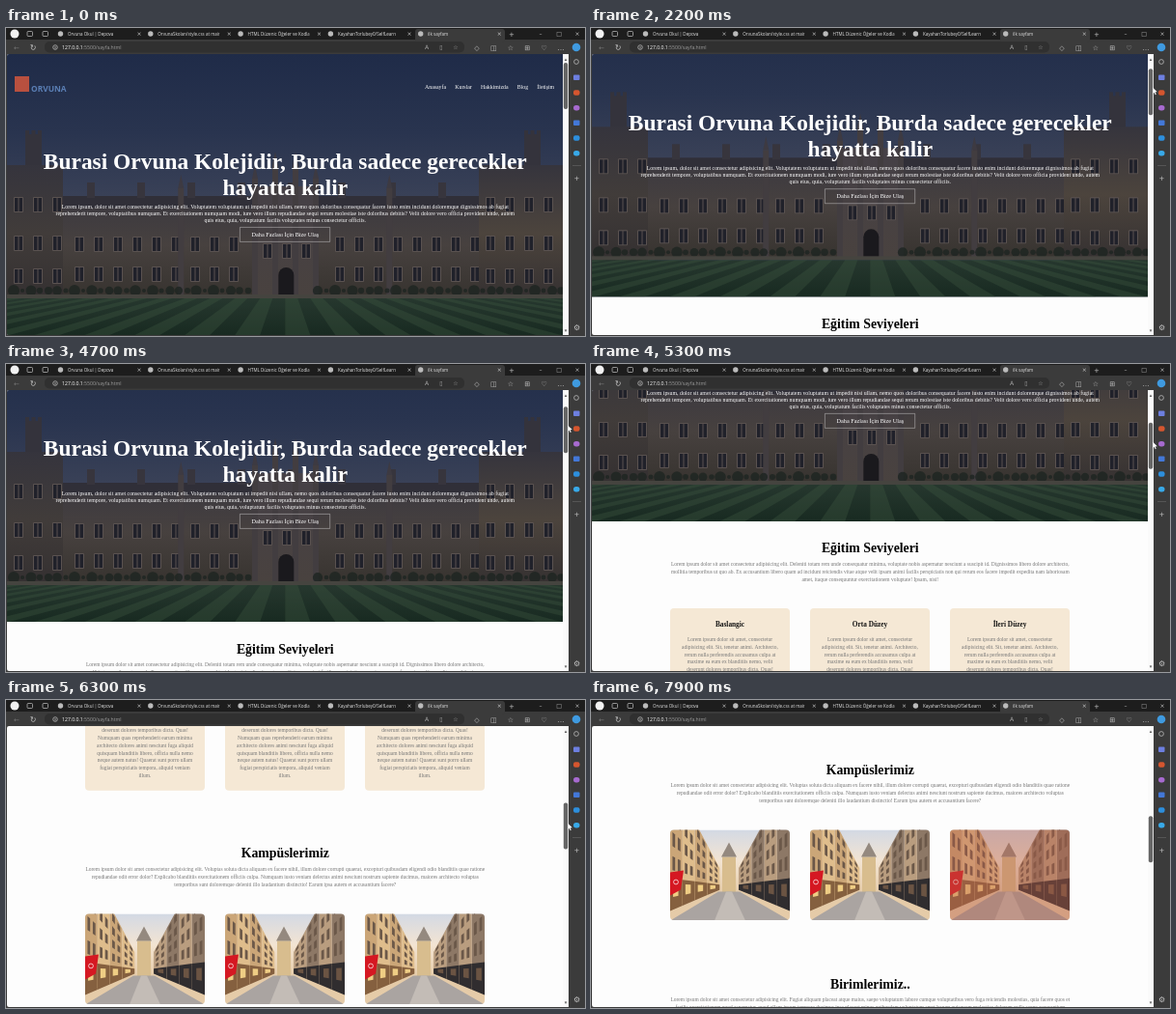
These frames come from a looping animation (600x319 px, 8000 ms). An HTML page with a canvas:

```html
<!DOCTYPE html>
<html lang="tr">
<head>
<meta charset="utf-8">
<title>ilk sayfam</title>
<style>
html, body { margin: 0; width: 100%; height: 100%; overflow: hidden; background: #1d1d1d; }
canvas { display: block; width: 600px; height: 319px; }
</style>
</head>
<body>
<canvas id="stage"></canvas>
<script>
const W = 600, H = 319, LOOP = 8000, STEP = 100;
const canvas = document.getElementById('stage');
const c = canvas.getContext('2d');
const dpr = window.devicePixelRatio || 1;
canvas.width = W * dpr;
canvas.height = H * dpr;

const SERIF = '"Liberation Serif", "Times New Roman", serif';
const SANS = '"Open Sans", "Noto Sans", sans-serif';
const SYMBOL = '"DejaVu Sans", sans-serif';
const ZOOM = 0.3906; // page scale: CSS pixels to stage pixels
const MID = 289.3, TOP = 27, RIGHT = 577, GROUND = 278, BOTTOM = 318;
const INK = '#c4c4c4';

const HERO = [
  'Lorem ipsum, dolor sit amet consectetur adipisicing elit. Voluptatem voluptatum ut impedit nisi ullam, nemo quos doloribus consequatur facere iusto enim incidunt doloremque dignissimos ab fugiat',
  'reprehenderit tempore, voluptatibus numquam. Et exercitationem numquam modi, iure vero illum repudiandae sequi rerum molestiae iste doloribus debitis? Velit dolore vero officia provident unde, autem',
  'quis eius, quia, voluptatum facilis voluptates minus consectetur officiis.'];
const LEVELS = [
  'Lorem ipsum dolor sit amet consectetur adipisicing elit. Deleniti totam rem unde consequatur minima, voluptate nobis aspernatur nesciunt a suscipit id. Dignissimos libero dolore architecto,',
  'mollitia temporibus ut quo ab. Ex accusantium libero quam ad incidunt reiciendis vitae atque velit ipsam animi facilis perspiciatis non qui rerum eos facere impedit expedita nam laboriosam',
  'amet, itaque consequuntur exercitationem voluptate! Ipsam, nisi!'];
const CARD = ['Lorem ipsum dolor sit amet, consectetur', 'adipisicing elit. Sit, tenetur animi. Architecto,',
  'rerum nulla perferendis accusamus culpa at', 'maxime ea eum ex blanditiis nemo, velit',
  'deserunt dolores temporibus dicta. Quas!', 'Numquam quas reprehenderit earum minima',
  'architecto dolores animi nesciunt fuga aliquid', 'quisquam blanditiis libero, officia nulla nemo',
  'neque autem natus! Quaerat sunt porro ullam', 'fugiat perspiciatis tempora, aliquid veniam', 'illum.'];
const CAMPUS = [
  'Lorem ipsum dolor sit amet consectetur adipisicing elit. Voluptas soluta dicta aliquam ex facere nihil, illum dolore corrupti quaerat, excepturi quibusdam eligendi odio blanditiis quae ratione',
  'repudiandae odit error dolor? Explicabo blanditiis exercitationem officiis culpa. Numquam iusto veniam delectus animi nesciunt nostrum sapiente ducimus, maiores architecto voluptas',
  'temporibus sunt doloremque deleniti illo laudantium distinctio! Earum ipsa autem et accusantium facere?'];
const UNITS = [
  'Lorem ipsum dolor sit amet consectetur adipisicing elit. Fugiat aliquam placeat atque maius, saepe voluptatum labore cumque voluptatibus vero fuga reiciendis molestias, quia facere quos et',
  'facilis exercitationem quod aspernatur, quod ullam ipsum tempora ducimus ipsa placeat minus quibusdam voluptatum amet harum quisquam molestiae dolorum nulla saepe accusantium'];

const glide = (t, from, to) => Math.max(0, Math.min(1, (t - from) / (to - from)));
const mix = (a, b, k) => a + (b - a) * k;
const cardX = i => 82 + 145 * i;

function rect(col, x, y, w, h) { c.fillStyle = col; c.fillRect(x, y, w, h); }

function pill(col, x, y, w, h, r) {
  c.fillStyle = col;
  c.beginPath();
  c.roundRect(x, y, w, h, r);
  c.fill();
}

function box(col, x, y, w, h, r = 1) {
  c.strokeStyle = col;
  c.lineWidth = 0.7;
  c.beginPath();
  c.roundRect(x, y, w, h, r);
  c.stroke();
}

function dot(col, x, y, r) { pill(col, x - r, y - r, 2 * r, 2 * r, r); }

function ring(col, x, y, r) { box(col, x - r, y - r, 2 * r, 2 * r, r); }

function poly(col, ...pts) {
  c.fillStyle = col;
  c.beginPath();
  for (let i = 0; i < pts.length; i += 2) c.lineTo(pts[i], pts[i + 1]);
  c.closePath();
  c.fill();
}

function text(s, x, y, size, col, align = 'left', weight = '', face = SERIF) {
  c.font = `${weight} ${size}px ${face}`;
  c.textAlign = align;
  c.fillStyle = col;
  c.fillText(s, x, y);
  return c.measureText(s).width;
}

function symbol(s, x, y, size = 7, col = INK) { text(s, x, y + size * 0.36, size, col, 'center', '', SYMBOL); }

function lines(list, x, y, lead, size, col) {
  list.forEach((s, i) => text(s, x, y + i * lead, size, col, 'center'));
}

function section(title, list, y) {
  text(title, MID, y, 13.8, '#000', 'center', 'bold');
  lines(list, MID, y + 13.5, 20 * ZOOM, 14 * ZOOM, '#777');
}

function fade(y0, y1, ...cols) {
  const g = c.createLinearGradient(0, y0, 0, y1);
  cols.forEach((col, i) => g.addColorStop(i / (cols.length - 1), col));
  return g;
}

function windows(x0, x1, y) {
  for (let x = x0; x < x1; x += 20) {
    pill('#5a5250', x - 1, y - 1, 10, 16, 1);
    rect('#20212a', x, y, 3.5, 14);
    rect('#20212a', x + 4.5, y, 3.5, 14);
  }
}

function pinnacle(x, top, w) {
  rect('#423d40', x - w / 2, top + 14, w, GROUND - top - 14);
  poly('#3d3a42', x - w / 2, top + 14, x, top, x + w / 2, top + 14);
}

function wing(x, w, tower, wall) {
  rect('#34333c', tower, 110, 17, 50);
  for (let i = 0; i < 3; i++) rect('#34333c', tower + i * 6.5, 106, 4, 5);
  rect(fade(140, 285, '#35343d', wall, '#332f30'), x, 142, w, 143);
  for (const y of [176, 216, 250]) windows(x + 8, x + w - 8, y);
}

function college() {
  rect(fade(TOP, 190, '#1f2b48', '#29344f', '#3d4459'), 1, TOP, 576, 291);
  rect(fade(172, GROUND, '#3a3840', '#47413f', '#37332f'), 55, 176, 445, 102);
  rect('#302f38', 55, 174, 445, 12);
  for (let x = 84; x < 500; x += 52) rect('#37353d', x, 160, 8, 16);
  for (const y of [217, 248]) {
    windows(72, 245, y);
    windows(342, 488, y);
  }
  for (const side of [-1, 1]) pinnacle(MID + side * 108, 152, 6);

  rect(fade(160, GROUND, '#454047', '#49423f'), 258, 164, 64, 114);
  for (let i = 0; i < 4; i++) pinnacle(258 + i * 21, i % 3 ? 128 : 142, 6);
  windows(267, 318, 224);
  pill('#1a191d', MID - 7, 248, 16, 30, [8, 8, 0, 0]);

  wing(1, 58, 20, '#413c3a');
  wing(490, 87, 537, '#4c443d');
  for (let x = 8; x < RIGHT; x += 9) {
    if (Math.abs(x - MID) > 30) dot('rgba(29,37,33,.8)', x, 272, 4 + 2 * Math.sin(x));
  }

  rect('#45443f', 1, GROUND - 2, 576, 4);
  rect(fade(GROUND, BOTTOM, '#27382f', '#182a21'), 1, GROUND + 2, 576, 38);
  for (let i = -22; i < 22; i++) {
    const near = MID + i * 52, far = MID + i * 26;
    poly('rgba(62,86,66,.36)', far, GROUND + 2, far + 13, GROUND + 2, near + 26, BOTTOM, near, BOTTOM);
  }
}

// One row of houses running from the picture's edge to the vanishing point.
function houses(edge, vx, vy, cols) {
  const x = k => mix(edge, vx, k), y = (h, k) => vy + h * (1 - k);
  const panel = (col, k0, k1, h0, h1) =>
    poly(col, x(k0), y(h0, k0), x(k1), y(h0, k1), x(k1), y(h1, k1), x(k0), y(h1, k0));
  for (let i = 0; i < 4; i++) {
    const k = i * 0.21;
    panel(cols[i % 2], k, k + 0.21, -115, 24);
    for (const n of [0.04, 0.13]) {
      for (let h = -110; h < -15; h += 26) panel('#6b5849', k + n, k + n + 0.045, h, h + 15);
    }
    panel(cols[2], k, k + 0.21, -8, 26);
    panel(cols[3], k + 0.05, k + 0.14, -2, 12);
  }
}

function street(x, y) {
  c.save();
  c.beginPath();
  c.roundRect(x, y, 124, 93.5, 4);
  c.clip();
  c.translate(x, y);
  rect(fade(0, 65, '#d3d9e4', '#f3e4d2', '#e5cba8'), 0, 0, 124, 94);
  rect('#d8bd8e', 54, 28, 14, 40);
  poly('#94897f', 53, 28, 61, 13, 69, 28);
  poly('#aaa4a1', 50, 64, 72, 64, 124, 94, 0, 94);
  poly('#c3bcb6', 58, 64, 64, 64, 78, 94, 46, 94);
  houses(0, 61, 58, ['#cba678', '#dfbd8c', '#85603f', '#efcd84']);
  houses(124, 61, 58, ['#8d7866', '#b99d7f', '#302d2f', '#6b5443']);
  poly('#d51822', 0, 44, 14, 42, 11, 62, 0, 68);
  ring('#fff', 6, 54, 2.4);
  c.restore();
}

function hero(red) {
  college();
  rect('#b8503f', 9, 50, 15, 16);
  text('ORVUNA', 26, 66, 8.4, '#5b7fb5', 'left', 'bold', SANS);
  let x = 434;
  for (const s of ['Anasayfa', 'Kurslar', 'Hakkimizda', 'Blog', 'İletişim']) {
    x += text(s, x, 63, 15 * ZOOM, '#fff') + 9.2;
  }
  text('Burasi Orvuna Kolejidir, Burda sadece gerecekler', MID, 145.5, 60 * ZOOM, '#fff', 'center', 'bold');
  text('hayatta kalir', MID, 172.5, 60 * ZOOM, '#fff', 'center', 'bold');
  lines(HERO, MID, 187, 6.9, 15 * ZOOM, '#fff');
  c.globalAlpha = red;
  rect('#c41217', 242, 206, 94, 15.5);
  c.globalAlpha = 1;
  box(`rgba(255,255,255,${0.5 * (1 - red)})`, 242.4, 206.4, 93.3, 15, 0);
  text('Daha Fazlası İçin Bize Ulaş', MID, 216, 16 * ZOOM, '#fff', 'center');
}

function page(scroll, red, tint) {
  c.save();
  c.beginPath();
  c.roundRect(1, TOP, 576, 291, [2, 0, 0, 2]);
  c.clip();
  rect('#fdfdfd', 0, TOP, 578, 292);
  c.translate(0, -scroll);

  if (scroll < BOTTOM - TOP) hero(red);
  section('Eğitim Seviyeleri', LEVELS, 350.5);
  ['Baslangic', 'Orta Düzey', 'İleri Düzey'].forEach((s, i) => {
    const mid = cardX(i) + 62;
    pill('#f5e8d5', cardX(i), 408, 124, 125.7, 4);
    text(s, mid, 427, 7.31, '#111', 'center', 'bold');
    lines(CARD, mid, 442, 20 * ZOOM, 14 * ZOOM, '#777');
  });
  section('Kampüslerimiz', CAMPUS, 603.5);
  for (let i = 0; i < 3; i++) street(cardX(i), 661.5);
  pill(`rgba(186,94,70,${0.4 * tint})`, cardX(2), 661.5, 124, 93.5, 4);
  section('Birimlerimiz..', UNITS, 825.5);
  c.restore();

  rect('#fafafa', RIGHT, TOP, 6, 291);
  symbol('▴', 580, 32, 5, '#555');
  symbol('▾', 580, 313, 5, '#555');
  pill('#666', 577.8, 36 + scroll * 0.16, 4.4, 48, 2);
}

function tab(s, x) {
  c.save();
  c.beginPath();
  c.rect(x, 0, 79, 12);
  c.clip();
  dot('#bbb', x + 7.5, 6, 2.7);
  text(s, x + 15, 7.8, 4.5, '#e4e4e4', 'left', '', SANS);
  c.restore();
  symbol('×', x + 89, 6, 6);
}

function browser() {
  rect('#1d1d1d', 0, 0, W, 13);
  rect('#3b3b3b', 0, 12, W, H);
  pill('#3b3b3b', 424, 1, 93, 14, 3);

  dot('#f2f2f2', 9, 6, 4.5);
  for (const x of [22, 38]) box(INK, x, 3.5, 5.5, 5);
  ['Orvuna Okul | Depova', 'OrvunaSkolan/style.css at main', 'HTML Düzenic Öğeler ve Kodlamaları',
    'KayahanTorlubey0/SelfLearn', 'ilk sayfam'].forEach((s, i) => tab(s, 49 + 93.3 * i));
  symbol('+', 524, 6);
  ['–', '□', '×'].forEach((s, i) => symbol(s, 554 + 19 * i, 6, 6));

  symbol('←', 11, 20, 7, '#777');
  symbol('↻', 28, 20, 8);
  pill('#303030', 40, 14, 435, 11.5, 5);
  ring(INK, 51, 20, 2.3);
  rect(INK, 50.7, 19, 0.7, 2.5);
  const w = text('127.0.0.1', 58, 21.8, 5.15, '#fff', 'left', '', SANS);
  text(':5500/sayfa.html', 58 + w, 21.8, 5.15, '#9c9c9c', 'left', '', SANS);
  ['A', '▯', '☆'].forEach((s, i) => symbol(s, 436 + 15 * i, 20, 6, '#aaa'));
  ['◇', '◫', '☆', '⊞', '♡', '…'].forEach((s, i) => symbol(s, 488 + 17.4 * i, 20));
  dot('#3f9ae0', 591, 20, 4.3);

  ring('#c8c8c8', 591, 35, 2.4);
  ['#6d7fe0', '#d5562f', '#a76ad0', '#4378d8', '#2d8fdd', '#38a9e8'].forEach((col, i) => {
    pill(col, 588, 48.5 + 15.7 * i, 6.5, 5.5, 1 + i % 3);
  });
  rect('#666', 587, 142, 9, 0.6);
  symbol('+', 591.5, 155);
  symbol('⚙', 591.5, 310, 8);
}

function pointer(x, y, hand) {
  c.save();
  c.translate(x, y);
  if (hand) {
    pill('#fff', -0.8, 0, 1.6, 5, 0.8);
    pill('#fff', -2, 2.8, 5.4, 4.6, 1.5);
  } else {
    poly('#fff', 0, 0, 0, 6.6, 1.6, 5.2, 2.7, 7.6, 3.7, 7.1, 2.7, 4.8, 4.8, 4.7);
  }
  c.restore();
}

function draw(t) {
  const scroll = 3 * glide(t, 1500, 1600) + 14 * glide(t, 1600, 1800)
    + 34 * glide(t, 2000, 2300) + 476 * glide(t, 4935, 6605);
  const red = glide(t, 2900, 3200) - glide(t, 3900, 4300);
  const tint = glide(t, 7300, 7800);

  // The pointer rides the scroll thumb, with visits to the button and the last picture.
  const enter = 1 - glide(t, 0, 600);
  const button = glide(t, 2400, 3100) - glide(t, 3800, 4600);
  const card = glide(t, 6900, 7500);
  const x = mix(mix(582 + 24 * enter, 326, button), 470, card);
  const y = mix(mix(55 + 36 * enter + scroll * 0.165, 162, button), 190, card);

  c.setTransform(dpr, 0, 0, dpr, 0, 0);
  browser();
  page(scroll, red, tint);
  if (t < 7800) pointer(x, y, button > 0.95);
}

let last = -1;
function tick() {
  const t = Math.floor(performance.now() % LOOP / STEP) * STEP;
  if (t !== last) draw(last = t);
  requestAnimationFrame(tick);
}
tick();
</script>
</body>
</html>
```
